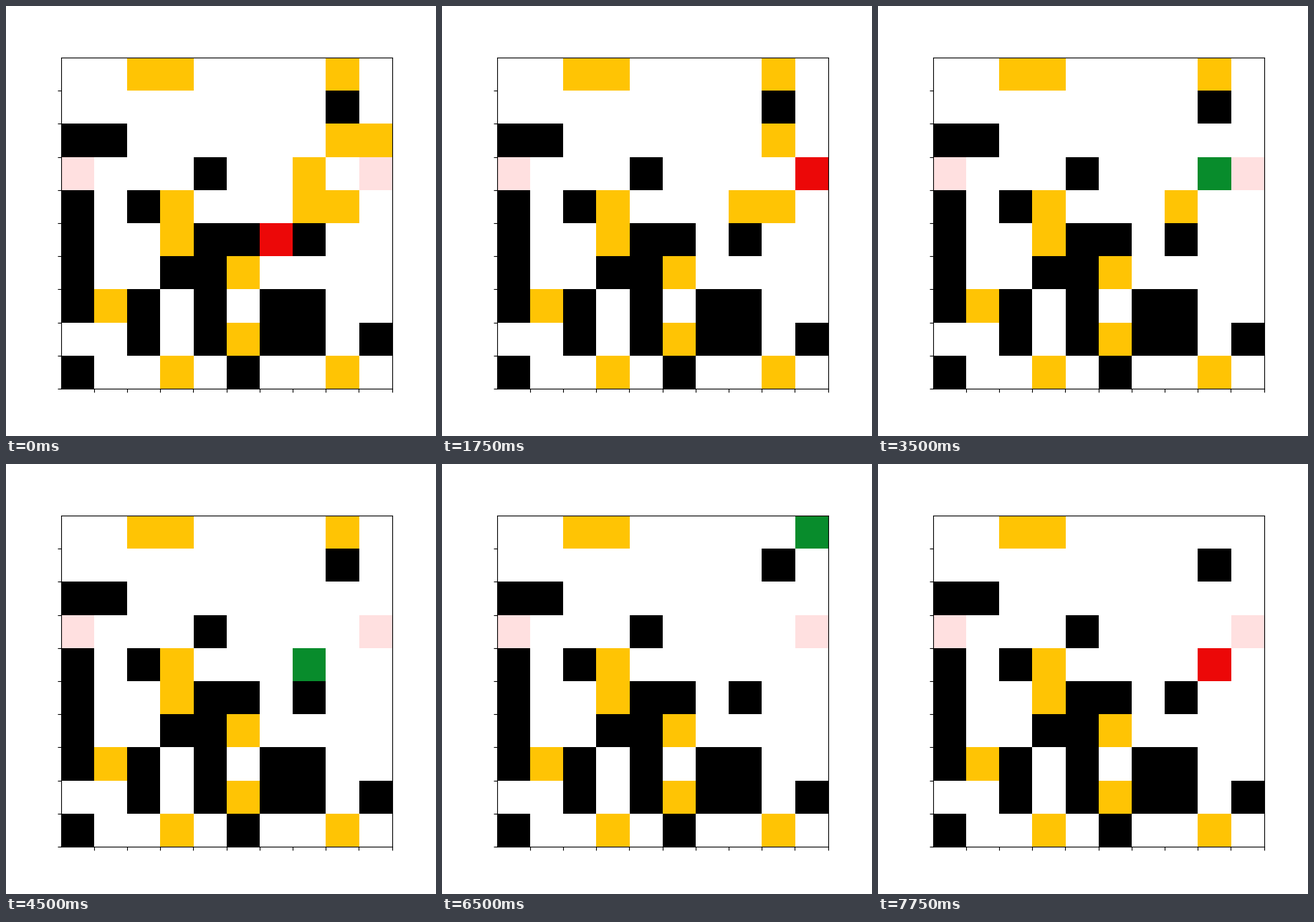
A matplotlib script that plays this animation: 600 by 600 pixels, repeating every 8000 ms.

```python
import numpy as np
import matplotlib.pyplot as plt
from matplotlib.animation import FuncAnimation
from matplotlib.colors import ListedColormap

# '.' floor, '#' wall, 'o' gold, 'D' depot
MAP = [
    "..oo....o.",
    "........#.",
    "##......oo",
    "D...#..o.D",
    "#.#o...oo.",
    "#..o##.#..",
    "#..##o....",
    "#o#.#.##..",
    "..#.#o##.#",
    "#..o.#..o.",
]
FLOOR, WALL, GOLD, DEPOT, EMPTY_HANDED, LOADED = range(6)
COLORS = ["#ffffff", "#000000", "#ffc404", "#ffe0e0", "#ec0808", "#088c2c"]

START = (5, 6)
STEPS = {"U": (-1, 0), "D": (1, 0), "L": (0, -1), "R": (0, 1)}
# one trip to a piece of gold and back to the depot per word
ROUTE = "UURRR UD LUDR LDUR LLDURR UUULRDDD LD".replace(" ", "")


def walk():
    """Return the grid as it looks after each step of the route."""
    world = np.array([[".#oD".index(c) for c in row] for row in MAP])
    pos, loaded = START, False
    grids = []
    for move in " " + ROUTE:
        dr, dc = STEPS.get(move, (0, 0))
        pos = (pos[0] + dr, pos[1] + dc)
        if world[pos] == GOLD and not loaded:
            world[pos] = FLOOR
            loaded = True
        elif world[pos] == DEPOT:
            loaded = False
        grid = world.copy()
        grid[pos] = LOADED if loaded else EMPTY_HANDED
        grids.append(grid)
    return grids


grids = walk()

fig, ax = plt.subplots(figsize=(6, 6), dpi=100)
image = ax.imshow(grids[0], cmap=ListedColormap(COLORS), vmin=-0.5, vmax=5.5,
                  interpolation="nearest")
edges = np.arange(0.5, 10)
ax.set_xticks(edges, labels=[])
ax.set_yticks(edges, labels=[])


def update(i):
    image.set_data(grids[i])
    return [image]


anim = FuncAnimation(fig, update, frames=len(grids), interval=250,
                     repeat=True, repeat_delay=0)
plt.show()
```
